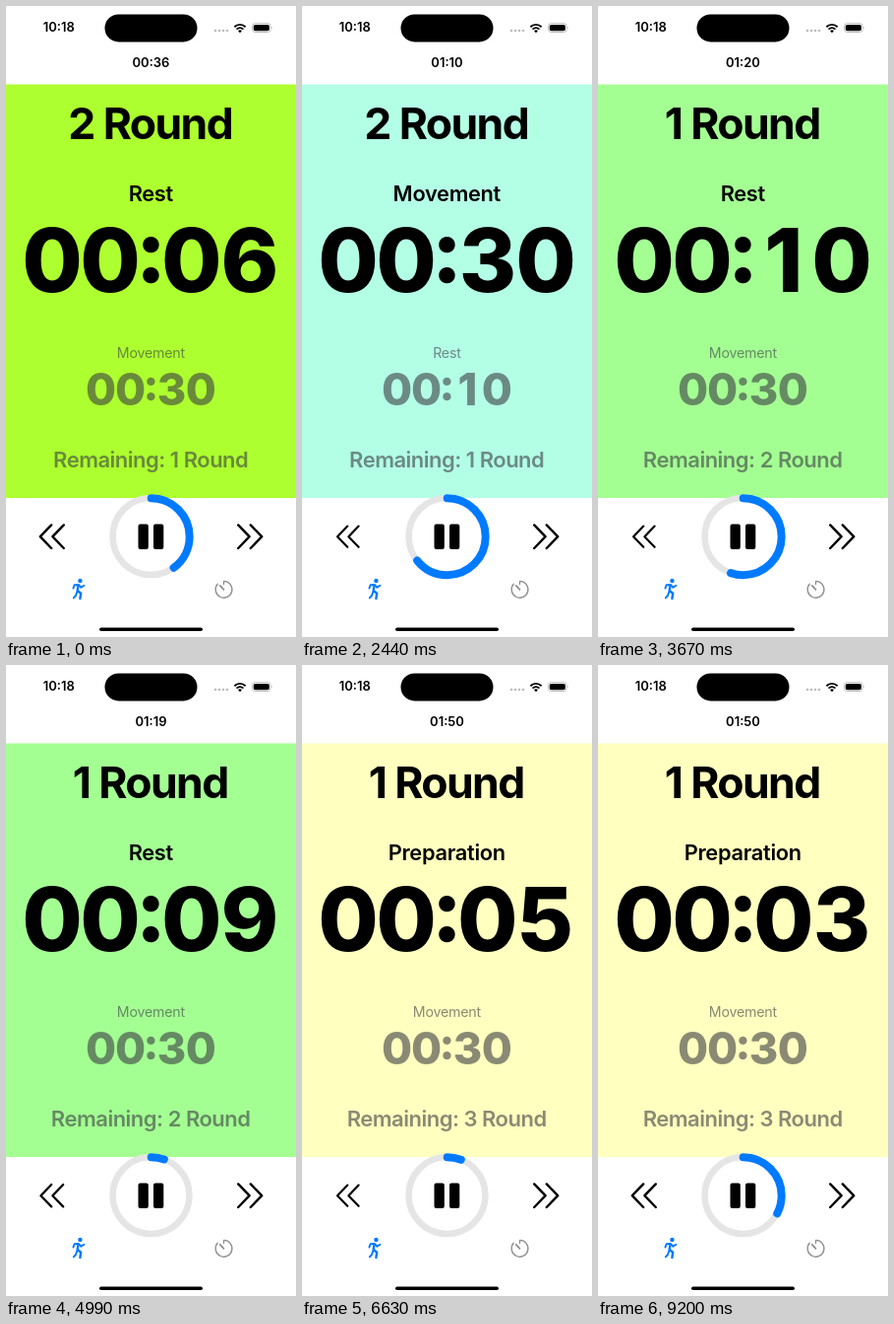
Write an HTML page that moves like this. It is 295 px wide and 640 px high and loops after 9.27 s.

```html
<!DOCTYPE html>
<html lang="en">
<head>
<meta charset="utf-8">
<title>Interval timer</title>
<style>
html, body { margin: 0; width: 100%; height: 100%; overflow: hidden; background: #fff; }
svg { display: block; width: 100vw; height: 100vh; }
text { font-family: Inter, sans-serif; font-weight: 600; text-anchor: middle; }
.dim { fill: #3c3c43; fill-opacity: .6; }
.digits { font-weight: 800; font-feature-settings: "case"; }
.line { fill: none; stroke-linecap: round; stroke-linejoin: round; }
#round { font-weight: 700; letter-spacing: -1.6px; }
#name { letter-spacing: -.3px; }
#nextName { font-weight: 400; letter-spacing: -.2px; }
#remain { letter-spacing: -.5px; }
</style>
</head>
<body>
<svg viewBox="0 0 295 640">
  <rect width="295" height="640" fill="#fff"/>
  <rect id="bg" y="79.5" width="295" height="419.5"/>

  <text x="53.7" y="26.4" font-size="13">10:18</text>
  <rect x="100.5" y="8.4" width="94" height="28" rx="14"/>
  <g fill="#bbb">
    <circle cx="213" cy="25" r="1.3"/><circle cx="217" cy="25" r="1.3"/>
    <circle cx="221" cy="25" r="1.3"/><circle cx="225" cy="25" r="1.3"/>
  </g>
  <g class="line" stroke="#000" stroke-width="1.9" style="stroke-linecap:butt">
    <path d="M232.4 21.2a8 8 0 0 1 11.2 0M234.6 23.6a5 5 0 0 1 6.8 0"/>
    <path d="M238 27.2l-1.9-1.9a2.7 2.7 0 0 1 3.8 0z" fill="#000" stroke="none"/>
  </g>
  <rect x="250.5" y="17.6" width="18.6" height="8.9" rx="2.9" fill="none" stroke="#aaa" stroke-width=".8"/>
  <rect x="251.8" y="18.9" width="16" height="6.3" rx="1.7"/>
  <path d="M270.1 20.5q1.3 1.5 0 3z" fill="#aaa"/>

  <text id="total" x="147.5" y="61.7" font-size="13"></text>
  <text id="round" x="146.7" y="134.6" font-size="44.5"></text>
  <text id="name" x="147.3" y="198.4" font-size="21.8"></text>
  <text id="left" class="digits" y="290.2" font-size="89"></text>
  <text id="nextName" class="dim" x="147.4" y="357" font-size="14.2"></text>
  <text id="nextTime" class="dim digits" y="405" font-size="45"></text>
  <text id="remain" class="dim" x="147.2" y="468" font-size="22"></text>

  <circle cx="147.5" cy="538" r="39" fill="#fff" stroke="#e5e5e5" stroke-width="6.6"/>
  <circle id="ring" class="line" cx="147.7" cy="538.2" r="39" pathLength="1" stroke="#007aff" stroke-width="8" transform="rotate(-90 147.7 538.2)"/>
  <rect x="134.5" y="525.5" width="10.3" height="25.5" rx="2"/>
  <rect x="150" y="525.5" width="10.3" height="25.5" rx="2"/>
  <g class="line" stroke="#000" stroke-width="2.4">
    <path id="back" d="M-.8-11.8L-12.2 0L-.8 11.8M11.8-11.8L.4 0L11.8 11.8"/>
    <path d="M.8-11.8L12.2 0L.8 11.8M-11.8-11.8L-.4 0L-11.8 11.8" transform="translate(248 538.2)"/>
  </g>

  <g class="line" stroke="#007aff" stroke-width="1.9">
    <circle cx="75.4" cy="583" r="2.2" fill="#007aff" stroke="none"/>
    <path d="M68.4 590.6L69.6 587.2L74 587L76.4 589.8L79.4 587.8"/>
    <path d="M73.6 587.6L72.6 593L76.2 595.8L75.4 601" stroke-width="2.4"/>
    <path d="M72.2 594.4L71 598L68.8 600.4"/>
  </g>
  <g class="line" stroke="#8e8e93" stroke-width="1.3">
    <path d="M221.5 586.4V583.4A8.4 8.4 0 1 1 215.2 586.3"/>
    <path d="M217.8 587.8L221.5 591.8" stroke-width="1.7"/>
  </g>
  <rect x="95" y="630.4" width="105" height="3.6" rx="1.8"/>
</svg>
<script>
const LOOP = 9270;
const $ = id => document.getElementById(id);

const LENGTH = { Preparation: 5, Movement: 30, Rest: 10 };
const phase = (name, round, remain, color) => ({ name, round, remain, color });
const prep = phase("Preparation", 1, 3, "#ffffbf");
const move1 = phase("Movement", 1, 2, "#b3ffe6");
const rest1 = phase("Rest", 1, 2, "#a4ff93");
const move2 = phase("Movement", 2, 1, "#b3ffe6");
const rest2 = phase("Rest", 2, 1, "#adff2f");

// start ms, phase, seconds left, total seconds left
const steps = [
  [0, rest2, 6, 36], [60, rest2, 5, 35], [1010, rest2, 4, 34], [2010, rest2, 3, 33],
  [2420, move2, 30, 70], [3450, move2, 29, 69],
  [3650, rest1, 10, 80], [4670, rest1, 9, 79],
  [5060, move1, 30, 110], [6010, move1, 29, 109],
  [6600, prep, 5, 110], [7580, prep, 4, 110], [8560, prep, 3, 110]
];
const presses = steps.filter((s, i) => i && s[1] !== steps[i - 1][1]).map(s => s[0]);

// Equal digit cells around the colon, in em from the centre.
const CELLS = [-1.13, -0.465, 0, 0.465, 1.13];
for (const el of document.querySelectorAll(".digits")) {
  const size = el.getAttribute("font-size");
  el.setAttribute("x", CELLS.map(c => 147.5 + c * size).join(" "));
}

const clamp = v => Math.min(1, Math.max(0, v));
const two = n => String(n).padStart(2, "0");
const clock = s => two(Math.floor(s / 60)) + ":" + two(s % 60);
const set = (id, value) => { $(id).textContent = value; };

// The ring only moves on ticks, gliding for one second to its new share.
function ringAt(t) {
  let from = 0.4, to = 0.4, start = 0;
  const value = at => from + (to - from) * clamp((at - start) / 1000);
  for (const [at, p, left] of steps) {
    if (at > t) break;
    if (!at || presses.includes(at)) continue;
    from = value(at);
    to = 1 - left / LENGTH[p.name];
    start = at;
  }
  return value(t);
}

function backScale(t) {
  let dip = 0;
  for (const at of presses) {
    const d = t - at;
    if (d > -120 && d <= 50) dip = clamp((d + 120) / 100);
    else if (d > 50 && d < 430) dip = (1 - (d - 50) / 380) ** 2;
  }
  return 1 - 0.1 * dip;
}

function draw(t) {
  const [, p, left, total] = steps.findLast(s => s[0] <= t);
  const next = p.name === "Movement" ? "Rest" : "Movement";
  $("bg").setAttribute("fill", p.color);
  set("total", clock(total));
  set("round", p.round + " Round");
  set("name", p.name);
  set("left", clock(left));
  set("nextName", next);
  set("nextTime", clock(LENGTH[next]));
  set("remain", "Remaining: " + p.remain + " Round");
  $("ring").setAttribute("stroke-dasharray", ringAt(t) + " 2");
  $("back").setAttribute("transform", `translate(47 538.2) scale(${backScale(t)})`);
}

const begin = performance.now();
function frame() {
  draw((performance.now() - begin) % LOOP);
  requestAnimationFrame(frame);
}
draw(0);
requestAnimationFrame(frame);
</script>
</body>
</html>
```
